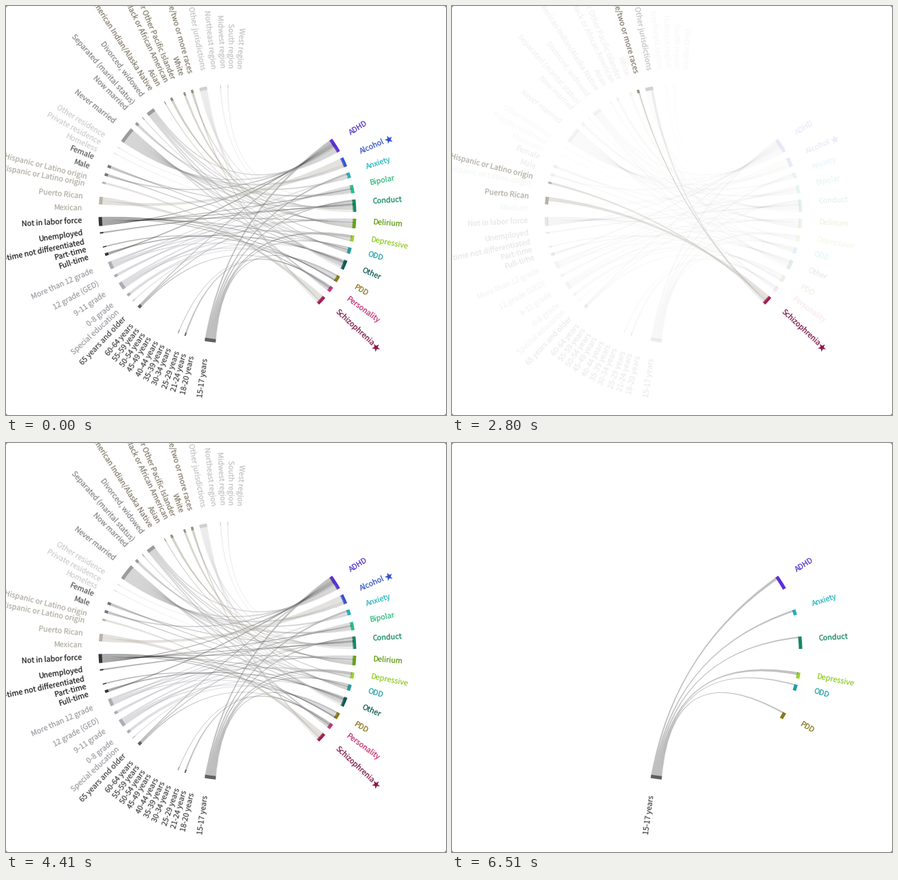
A matplotlib script that plays this animation: 640x594 px, repeating every 6.86 s.

```python
import math

import matplotlib.pyplot as plt
from matplotlib.animation import FuncAnimation
from matplotlib.patches import FancyBboxPatch, PathPatch, Polygon
from matplotlib.path import Path

W, H, DPI = 640, 594, 100
STEP, LOOP = 70, 6860
CX, CY = 322, 302
R_IN, R_OUT, R_LINK, R_TEXT = 182.5, 187.5, 184, 212
LINK_ALPHA = 0.38
FONT_PX = 10.85

plt.rcParams["text.hinting"] = "none"

# key, label, angle, arc length, bar colour, text colour
DISORDERS = [
    ("A", "ADHD", -32.4, 21, "#5a2fdc", "#5433c4"),
    ("L", "Alcohol", -23.9, 14, "#3052d8", "#3553c0"),
    ("X", "Anxiety", -17.6, 8, "#1fb2b6", "#2bb5bb"),
    ("B", "Bipolar", -11.2, 12, "#25bf82", "#2fba82"),
    ("C", "Conduct", -3.7, 18, "#118a5c", "#118a5c"),
    ("D", "Delirium", 4.3, 14, "#62a314", "#5c9a14"),
    ("P", "Depressive", 11.1, 9, "#97d42a", "#92cc2a"),
    ("O", "ODD", 16.7, 9, "#1c9fa5", "#1c9fa5"),
    ("T", "Other", 23.5, 14, "#0e5a54", "#0e5a54"),
    ("V", "PDD", 30.5, 9.5, "#8a7914", "#84731a"),
    ("Y", "Personality", 36.1, 8, "#c7337c", "#c42f74"),
    ("Z", "Schizophrenia", 42.6, 13, "#a5184f", "#7c1846"),
]

# bar colour, text colour, then label, angle, arc length, linked keys
GROUPS = [
    ("#606060", "#4a4a4a", [
        ("15-17 years", 97.7, 16, "VOPCXA"),
        ("18-20 years", 103.1, 0, ""),
        ("21-24 years", 106.2, 0, ""),
        ("25-29 years", 109.2, 2, "Y"),
        ("30-34 years", 112.5, 0.8, "Y"),
        ("35-39 years", 115.4, 0, ""),
        ("40-44 years", 118.3, 0, ""),
        ("45-49 years", 121.3, 0, ""),
        ("50-54 years", 124.2, 0, ""),
        ("55-59 years", 127.1, 0, ""),
        ("60-64 years", 130.1, 0, ""),
        ("65 years and older", 133.5, 4.5, "YCA"),
    ]),
    ("#acacb4", "#a0a0a6", [
        ("Special education", 137.4, 1, "D"),
        ("0-8 grade", 140.8, 4, "VT"),
        ("9-11 grade", 145.8, 11, "DVOC"),
        ("12 grade (GED)", 151.1, 4, "BD"),
        ("More than 12 grade", 156.3, 11, "BVPXD"),
    ]),
    ("#333333", "#222222", [
        ("Full-time", 161.6, 4, "AT"),
        ("Part-time", 165.1, 1.5, "V"),
        ("Full-/Part-time not differentiated", 168.2, 0, ""),
        ("Unemployed", 171.5, 2, "C"),
        ("Not in labor force", 176.6, 13, "ABCDOYTV"),
    ]),
    ("#b8b4a9", "#b3afa4", [
        ("Mexican", 181.3, 0, ""),
        ("Puerto Rican", 186.0, 11, "LZ"),
        ("Other Hispanic or Latino origin", 190.9, 0, ""),
        ("Not of Hispanic or Latino origin", 194.1, 3, "Z"),
    ]),
    ("#777777", "#5c5c5c", [
        ("Male", 197.9, 4, "AT"),
        ("Female", 201.8, 4, "CO"),
    ]),
    ("#d8d8d8", "#cfcfcf", [
        ("Homeless", 205.0, 0, ""),
        ("Private residence", 208.2, 1, "D"),
        ("Other residence", 211.3, 1, "X"),
    ]),
    ("#9b9b9b", "#8a8a8a", [
        ("Never married", 218.0, 23, "ALXBCDOTY"),
        ("Now married", 224.8, 4, "BD"),
        ("Separated (marital status)", 228.6, 1, "O"),
        ("Divorced, widowed", 233.1, 12, "YTDCA"),
    ]),
    ("#96917f", "#857f6e", [
        ("American Indian/Alaska Native", 237.3, 0, ""),
        ("Asian", 240.7, 1.2, "P"),
        ("Black or African American", 244.1, 3.5, "CD"),
        ("Native Hawaiian or Other Pacific Islander", 247.1, 0, ""),
        ("White", 250.4, 3, "O"),
        ("Some other race/two or more races", 254.0, 3.5, "DZ"),
    ]),
    ("#d0d0d0", "#c4c4c4", [
        ("Other jurisdictions", 259.1, 11, "CTZ"),
        ("Northeast region", 263.4, 0, ""),
        ("Midwest region", 266.9, 1.2, "C"),
        ("South region", 270.2, 1.2, "B"),
        ("West region", 273.5, 0, ""),
    ]),
]

# start, end, scene faded in
FADES = [
    (30, 320, "link"),
    (970, 1300, "all"),
    (1890, 2110, "Z"),
    (2710, 3010, "all"),
    (3150, 3500, "Y"),
    (4200, 4420, "all"),
    (4420, 4620, "V"),
    (5320, 5740, "all"),
    (6230, 6510, "15-17 years"),
]
HOVERED = ("More than 12 grade", "P")


def polar(r, deg):
    a = math.radians(deg)
    return CX + r * math.cos(a), CY + r * math.sin(a)


def arc(r, a0, a1, n=8):
    return [polar(r, a0 + (a1 - a0) * i / n) for i in range(n + 1)]


def slots(angle, size, weights):
    """Split an arc into angle pairs in proportion to the weights."""
    width = math.degrees(size / 185)
    a, out = angle - width / 2, []
    for w in weights:
        b = a + width * w / sum(weights)
        out.append((a, b))
        a = b
    return out


def ease(p):
    p = min(max(p, 0), 1)
    return 4 * p ** 3 if p < 0.5 else 1 - (2 - 2 * p) ** 3 / 2


fig = plt.figure(figsize=(W / DPI, H / DPI), dpi=DPI, facecolor="#666666")
ax = fig.add_axes([0, 0, 1, 1])
ax.set_xlim(0, W)
ax.set_ylim(H, 0)
ax.axis("off")
ax.add_patch(FancyBboxPatch((3, 3), W - 6, H - 6, lw=0, fc="white", zorder=0,
                            boxstyle="round,pad=3,rounding_size=3"))

parts = []  # (artist, full alpha, node names, is link)


def add_bar(key, angle, size, color):
    a0, a1 = slots(angle, size, [1])[0]
    pts = arc(R_IN, a0, a1) + arc(R_OUT, a1, a0)
    bar = ax.add_patch(Polygon(pts, fc=color, lw=0, zorder=2))
    parts.append((bar, 1, (key,), False))


def add_label(key, text, angle, color, left):
    x, y = polar(R_TEXT, angle)
    label = ax.text(x, y, text, color=color, fontsize=FONT_PX * 72 / DPI,
                    family="Noto Sans CJK JP", rotation=(180 if left else 0) - angle,
                    rotation_mode="anchor", ha="right" if left else "left",
                    va="baseline", zorder=4)
    parts.append((label, 1, (key,), False))


def add_star(key, r, angle, color):
    x, y = polar(r, angle)
    a = math.radians(angle)
    x, y = x + 3.5 * math.sin(a), y - 3.5 * math.cos(a)
    pts = []
    for i in range(10):
        t = a - math.pi / 2 + i * math.pi / 5
        k = 2.5 if i % 2 else 6.2
        pts.append((x + k * math.cos(t), y + k * math.sin(t)))
    star = ax.add_patch(Polygon(pts, fc=color, lw=0, zorder=4))
    parts.append((star, 1, (key,), False))


def add_link(name, key, src, dst, color):
    s, d = arc(R_LINK, *src, 4), arc(R_LINK, *dst, 4)
    verts = s + [(CX, CY)] + d + [(CX, CY), s[0]]
    codes = ([Path.MOVETO] + [Path.LINETO] * 4 + [Path.CURVE3] * 2
             + [Path.LINETO] * 4 + [Path.CURVE3] * 2)
    link = ax.add_patch(PathPatch(Path(verts, codes), fc=color, ec=color,
                                  lw=0.1, zorder=3))
    parts.append((link, LINK_ALPHA, (name, key), True))


traits = [(*row, bar, ink) for bar, ink, rows in GROUPS for row in rows]

# A link is about as wide at the disorder as at the trait.
linked, target = {}, {}
for key, _, angle, size, _, _ in DISORDERS:
    peers = [t for t in traits if key in t[3]]
    linked[key] = [t[0] for t in peers]
    pairs = slots(angle, size, [t[2] / len(t[3]) for t in peers])
    target.update({(t[0], key): pair for t, pair in zip(peers, pairs)})

for key, text, angle, size, bar, ink in DISORDERS:
    add_bar(key, angle, size, bar)
    add_label(key, text, angle, ink, False)
add_star("L", 258.5, -23.9, "#3052c8")
add_star("Z", 290.5, 42.6, "#8a1846")

for name, angle, size, keys, bar, ink in traits:
    add_label(name, name, angle, ink, True)
    if size:
        add_bar(name, angle, size, bar)
    for key, src in zip(keys, slots(angle, size, [1] * len(keys))):
        add_link(name, key, src, target[name, key], bar)

neighbours = {k: {k, *names} for k, names in linked.items()}
for trait in traits:
    neighbours[trait[0]] = {trait[0], *trait[3]}


def shown(scene, names, is_link):
    if scene == "all":
        return 1
    if scene == "link":
        if names == HOVERED:
            return 2
        return int(not is_link)
    if is_link:
        return int(scene in names)
    return int(names[0] in neighbours[scene])


def update(i):
    t = i * STEP
    before, after, p = "all", "all", 1
    for start, end, scene in FADES:
        if t >= start:
            before, after = after, scene
            p = ease((t - start) / (end - start))
    for artist, alpha, names, is_link in parts:
        a, b = shown(before, names, is_link), shown(after, names, is_link)
        level = a + (b - a) * p
        artist.set_alpha(alpha * level)
        artist.set_visible(level > 0.002)
    return [part[0] for part in parts]


anim = FuncAnimation(fig, update, frames=LOOP // STEP, interval=STEP,
                     init_func=lambda: update(0), repeat=True, repeat_delay=0)
plt.show()
```
